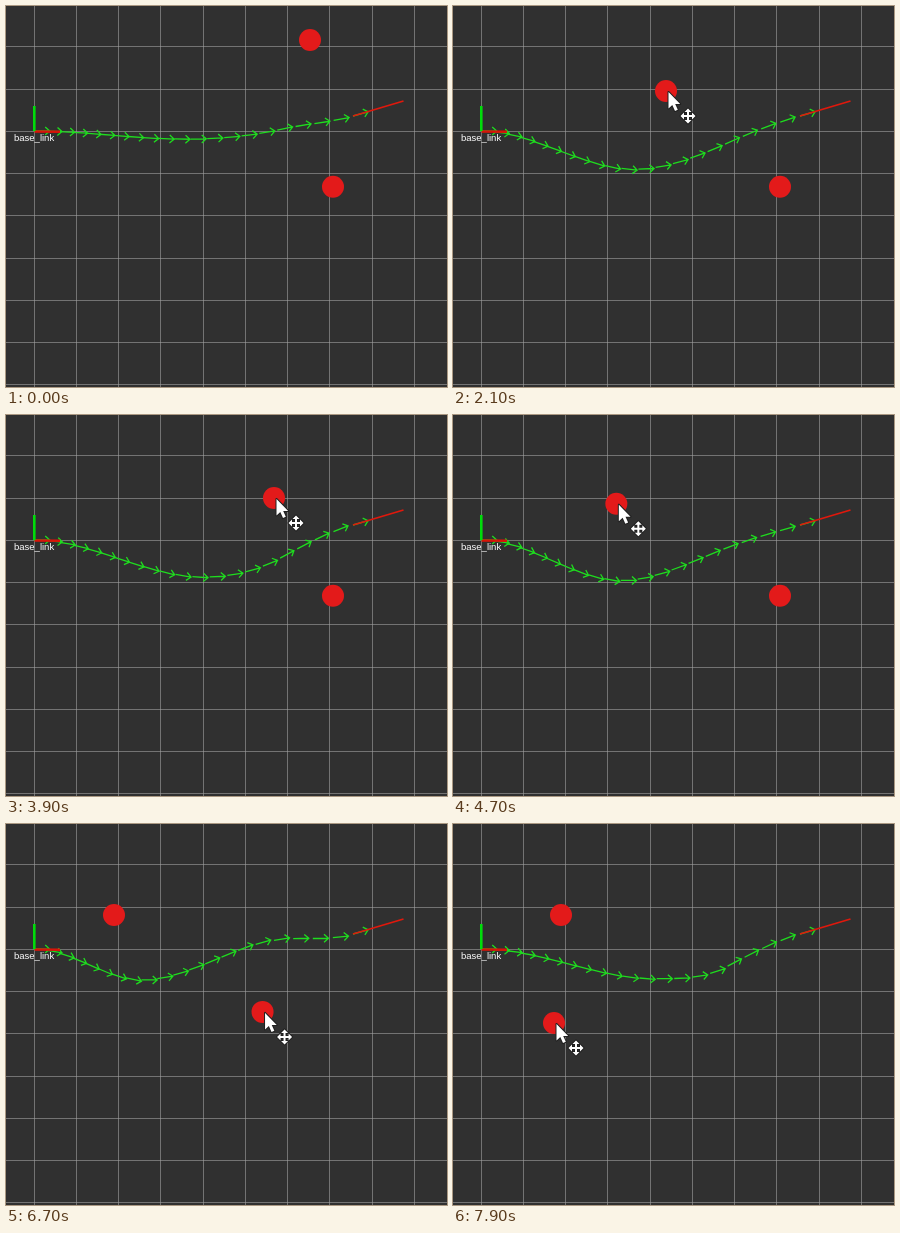
An HTML page with a canvas for the animation above (8 s loop, 441 by 381 pixels).

```html
<!DOCTYPE html>
<html lang="en">
<head>
<meta charset="utf-8">
<title>Path planning around obstacles</title>
<style>
  html, body { margin: 0; height: 100%; overflow: hidden; background: #303030; }
  canvas { display: block; }
</style>
</head>
<body>
<canvas id="stage" width="441" height="381"></canvas>
<script>
const ctx = document.getElementById('stage').getContext('2d');
const LOOP = 8000, STEP = 100, CURSOR_APPEARS = 600;
const RED = '#e31a1a', GREEN = '#1fdc1f';
const CELL = 42.25;
const ARROW_COUNT = 21, ARROW_LENGTH = 15.7;
const GRIP = { x: 2.5, y: 1 };
const START = { x: 28, y: 125, slope: 0 };
const GOAL = { x: 347, y: 110, slope: -0.28 };

// The hand drags the upper obstacle about, then the lower one: [time, x, y].
const UPPER_DRAG = [1200, 5000], LOWER_DRAG = [6200, 7900];
const hand = [
  [700, 305, -2], [800, 311, 8], [1000, 306.5, 35], [1200, 306.5, 35],
  [1500, 285.5, 44], [2100, 215.5, 86], [2700, 142.5, 98], [3050, 114.5, 102],
  [3900, 270.5, 84], [4100, 276.5, 85], [5000, 110.5, 92],
  [5500, 336, 194], [5700, 329.5, 181.7], [6200, 329.5, 181.7],
  [7300, 174.5, 197.5], [7900, 103.5, 200]
];
// How the lower obstacle shifts the dip of the path.
const dipShift = [[6200, 0, 0], [7300, -37, -24], [7900, 49, -12]];

const clamp = (v, [low, high]) => Math.min(high, Math.max(low, v));

function sample(track, time) {
  const t = clamp(time, [track[0][0], track[track.length - 1][0]]);
  const i = Math.max(1, track.findIndex(key => key[0] >= t));
  const [t0, x0, y0] = track[i - 1], [t1, x1, y1] = track[i];
  const f = (t - t0) / (t1 - t0);
  return { x: x0 + (x1 - x0) * f, y: y0 + (y1 - y0) * f };
}

function obstacle(t, drag) {
  const p = sample(hand, clamp(t, drag));
  return { x: p.x - GRIP.x, y: p.y - GRIP.y };
}

// The upper obstacle presses a dip into the path; beyond it the path climbs over a shoulder.
function plan(upper, shift) {
  const dip = {
    x: 67 + 0.3 * upper.x + 0.59 * upper.y + shift.x,
    y: 113 + 0.59 * upper.y + shift.y,
    slope: 0
  };
  const shoulderY = Math.max(112, 124 + 0.41 * (dip.x - 180) + 0.41 * (dip.y - 133));
  const shoulder = { x: 275, y: shoulderY, slope: 1.2 * (GOAL.y - shoulderY) / (GOAL.x - 275) };
  return [START, dip, shoulder, GOAL];
}

// Cubic Hermite curve through the nodes.
function heightAt(nodes, x) {
  const i = Math.max(1, nodes.findIndex(node => node.x >= x));
  const a = nodes[i - 1], b = nodes[i];
  const w = b.x - a.x, u = (x - a.x) / w, v = 1 - u;
  return v * v * (1 + 2 * u) * a.y + u * u * (3 - 2 * u) * b.y
    + w * u * v * (v * a.slope - u * b.slope);
}

function line(x1, y1, x2, y2, color, width) {
  ctx.strokeStyle = color;
  ctx.lineWidth = width;
  ctx.beginPath();
  ctx.moveTo(x1, y1);
  ctx.lineTo(x2, y2);
  ctx.stroke();
}

function drawGrid() {
  ctx.fillStyle = '#303030';
  ctx.fillRect(0, 0, 441, 381);
  ctx.fillStyle = 'rgba(160, 160, 160, 0.6)';
  for (let i = 0; i < 10; i++) ctx.fillRect(Math.floor(28 + CELL * i), 0, 1, 381);
  for (let i = 0; i < 9; i++) ctx.fillRect(0, Math.floor(40.75 + CELL * i), 441, 1);
}

function drawArrow(x, y, angle) {
  ctx.save();
  ctx.translate(x, y);
  ctx.rotate(angle);
  ctx.strokeStyle = GREEN;
  ctx.lineWidth = 1.3;
  ctx.beginPath();
  ctx.moveTo(0, 0);
  ctx.lineTo(ARROW_LENGTH, 0);
  ctx.moveTo(ARROW_LENGTH - 4.5, -4);
  ctx.lineTo(ARROW_LENGTH, 0);
  ctx.lineTo(ARROW_LENGTH - 4.5, 4);
  ctx.stroke();
  ctx.restore();
}

// Arrows follow the arc length, with spacing that widens towards the goal.
function drawPath(nodes) {
  const height = x => heightAt(nodes, x);
  const lengths = [0];
  for (let x = START.x; x < GOAL.x; x++) {
    lengths.push(lengths[x - START.x] + Math.hypot(1, height(x + 1) - height(x)));
  }
  const last = lengths.length - 1;
  for (let k = 0; k < ARROW_COUNT; k++) {
    const u = k / (ARROW_COUNT - 1);
    const distance = lengths[last] * (0.75 * u + 0.25 * u * u);
    const i = clamp(lengths.findIndex(length => length >= distance), [1, last]);
    const f = (distance - lengths[i - 1]) / (lengths[i] - lengths[i - 1]);
    const x = START.x + i - 1 + f;
    const slope = height(START.x + i) - height(START.x + i - 1);
    drawArrow(x, height(x), Math.atan(slope));
  }
}

function drawDisc({ x, y }) {
  ctx.fillStyle = RED;
  ctx.beginPath();
  ctx.arc(x, y, 11, 0, Math.PI * 2);
  ctx.fill();
}

function outlined(points) {
  ctx.beginPath();
  points.forEach(([x, y]) => ctx.lineTo(x, y));
  ctx.closePath();
  ctx.strokeStyle = '#202020';
  ctx.lineWidth = 2;
  ctx.lineJoin = 'round';
  ctx.stroke();
  ctx.fillStyle = '#fff';
  ctx.fill();
}

const pointer = [[0, 0], [0, 16.5], [3.8, 13], [6.5, 19], [9.3, 17.8], [6.7, 12], [11.7, 12]];
const arm = [[-1, -1], [-1, -4], [-3.5, -4], [0, -7.5], [3.5, -4], [1, -4]];
const turn = ([x, y], quarters) => quarters ? turn([-y, x], quarters - 1) : [x, y];
const moveIcon = [0, 1, 2, 3].flatMap(q => arm.map(p => turn(p, q)));

function drawCursor({ x, y }) {
  ctx.save();
  ctx.translate(x, y);
  outlined(pointer);
  ctx.translate(19.5, 24);
  outlined(moveIcon);
  ctx.restore();
}

function draw(t) {
  const upper = obstacle(t, UPPER_DRAG), lower = obstacle(t, LOWER_DRAG);
  drawGrid();
  drawPath(plan(upper, sample(dipShift, t)));
  line(28.5, 125.5, 54, 125.8, '#d81408', 2.4);
  line(28.3, 100, 28.3, 125, '#00dc0a', 2.6);
  line(347, 110, 397.5, 95, '#e0180c', 1.8);
  ctx.fillStyle = '#fff';
  ctx.font = '9.5px "Liberation Sans", Arial, sans-serif';
  ctx.fillText('base_link', 8, 134.7);
  drawDisc(upper);
  drawDisc(lower);
  if (t >= CURSOR_APPEARS) drawCursor(sample(hand, t));
}

const startTime = performance.now();
function tick() {
  const t = (performance.now() - startTime) % LOOP;
  draw(Math.floor(t / STEP) * STEP);
  requestAnimationFrame(tick);
}
tick();
</script>
</body>
</html>
```
